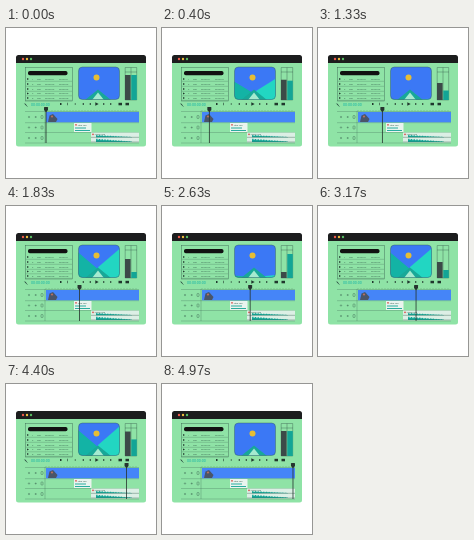
Animation, 150 px wide and 150 px high, one loop 5.01 s. Source, as an HTML page:

```html
<!DOCTYPE html>
<html lang="en">
<head>
<meta charset="utf-8">
<title>Video editor</title>
<style>
html, body { margin: 0; width: 100%; height: 100%; overflow: hidden; background: #fff; }
svg { display: block; width: 100vw; height: 100vh; }
text { font-family: Roboto, Arial, sans-serif; font-size: 2.4px; fill: #33594a; }
.line { fill: none; stroke: #33594a; stroke-width: .4; }
</style>
</head>
<body>
<svg viewBox="0 0 150 150">
  <defs>
    <clipPath id="screen"><rect x="72.5" y="39" width="41" height="32.5" rx="4"/></clipPath>
  </defs>
  <path fill="#8fe3a6" d="M10 34H140V116Q140 118.500 137.500 118.500H12.500Q10 118.500 10 116Z"/>
  <path fill="#1c1d1e" d="M10 35V29.500Q10 27 12.500 27H137.500Q140 27 140 29.500V35Z"/>
  <circle cx="17" cy="31" r="1.2" fill="#ef5b4c"/>
  <circle cx="21" cy="31" r="1.2" fill="#efbd3e"/>
  <circle cx="25" cy="31" r="1.2" fill="#59bd63"/>

  <rect class="line" x="19.500" y="39.500" width="47" height="33.500"/>
  <rect x="22" y="43" width="39.500" height="4.200" rx="1.800" fill="#111"/>
  <g id="list"></g>

  <g clip-path="url(#screen)">
    <rect x="72" y="38" width="42" height="34" fill="#3b78f5"/>
    <circle cx="90.500" cy="49.500" r="3" fill="#e6bd35"/>
    <path id="left" fill="#13b3a5"/>
    <path id="right" fill="#22d6c2"/>
    <path id="peak" fill="#18a898"/>
    <path id="road" fill="#a5ead0"/>
  </g>
  <rect class="line" x="72.500" y="39" width="41" height="32.500" rx="4"/>

  <path class="line" d="M119.200 39.500H130.700V72H119.200ZM119 44H131M125 39.500V72"/>
  <rect id="dark" x="119" width="5.600" fill="#3c4a48"/>
  <rect id="teal" x="125.300" width="5.500" fill="#13a596"/>

  <path class="line" d="M18.700 75.800L21.300 78.500M19 75.500L20 77" style="stroke-width:.9"/>
  <text x="25" y="78.300" style="fill:#13b3a5;font-size:3.6px">00:00:00:00</text>
  <g id="controls" fill="#20372d"></g>

  <path class="line" d="M39 83V115M19 83.500H133M19 94.700H133M19 104.500H133M19 115H133" opacity=".65"/>
  <path id="ruler" class="line" opacity=".6"/>
  <g id="tracks"></g>
  <rect x="40" y="84" width="93" height="10.300" fill="#4585f8"/>
  <path d="M42 94L43.500 87.500L47 86L51.500 91L50 94Z" fill="#4a5568"/>
  <circle cx="46" cy="88.500" r="1.100" fill="#b8705f"/>

  <rect x="68" y="95" width="17.500" height="9" fill="#e9f4ee"/>
  <circle cx="70" cy="96.800" r=".9" fill="#d9534f"/>
  <text x="71.500" y="98">Title clip</text>
  <path class="line" d="M69 100H80M69 102.500H84" style="stroke:#13a596;stroke-width:.9"/>

  <rect x="85" y="104.500" width="48" height="10" fill="#dcefe5"/>
  <path id="wave" fill="#13a596"/>
  <path class="line" d="M85 109.300H133M85 114H133"/>
  <circle cx="87" cy="106.300" r=".9" fill="#d9534f"/>
  <text x="88.500" y="107">Audio clip</text>

  <g id="playhead" fill="#26342f">
    <path d="M-2 79.500Q-2 79 -1.500 79H1.500Q2 79 2 79.500V82L0 84.300L-2 82Z"/>
    <rect x="-.4" y="82" width=".8" height="33"/>
  </g>
</svg>
<script>
const $ = id => document.getElementById(id);
const duration = 5010;
const set = (id, values) => {
  for (const key in values) $(id).setAttribute(key, values[key]);
};

$("list").innerHTML = [51, 56, 61, 65.500, 70].map((y, i) => `
  <path fill="#20372d" d="M21 ${y - 1.100}L23 ${y}L21 ${y + 1.100}Z"/>
  <text x="26" y="${y + .8}">${i + 1}</text>
  <text x="31" y="${y + .8}">clip</text>
  <text x="39" y="${y + .8}">00:00:0${i + 1}</text>
  <text x="53" y="${y + .8}">00:00:0${i + 1}</text>
  <path class="line" d="M20 ${y + 2.300}H66" opacity=".6"/>`).join("");

const triangle = (x, size, dir = 1) =>
  `M${x - size * dir} ${76 - size}L${x + size * dir} 76L${x - size * dir} ${76 + size}Z`;
$("controls").innerHTML = `
  <path d="M54 75H55.500V77H54ZM61 74.700H61.600V77.300H61Z"/>
  <path d="${triangle(69, .8, -1)}${triangle(77, 1, -1)}${triangle(84, 1, -1)}"/>
  <path d="${triangle(91, 1.700)}${triangle(98, 1)}${triangle(105, 1)}"/>
  <rect x="112.500" y="74.800" width="3.500" height="2.500"/>
  <rect x="119.500" y="74.800" width="3.500" height="2.500"/>`;

let ticks = "";
for (let x = 40; x < 133; x += 3) ticks += `M${x} 82V83.200`;
set("ruler", { d: ticks });

$("tracks").innerHTML = [89, 99.500, 110].map(y => `
  <circle class="line" cx="23" cy="${y}" r=".7"/>
  <path class="line" d="M28.700 ${y}H30.700M29.700 ${y - 1}V${y + 1}"/>
  <rect class="line" x="35" y="${y - 1.500}" width="2" height="3" rx=".6"/>`).join("");

// Two audio channels, each fading towards the right.
const channel = (base, height) => {
  let path = `M90 ${base}`;
  for (let x = 90; x <= 126; x++) {
    const fade = 1 - (x - 90) / 42;
    path += `L${x} ${base - height * fade * (.7 + .3 * Math.sin(x * 2.3))}`;
  }
  return path + `L126 ${base}Z`;
};
set("wave", { d: channel(109.300, 2.800) + channel(114, 4) });

const darkKeys = [[0, 47], [830, 57], [1830, 53], [2630, 66], [3170, 56], [3830, 48], [5010, 47]];
const tealKeys = [[0, 47], [830, 59], [1830, 66], [2630, 48], [3170, 64], [3830, 63], [5010, 47]];
function level(keys, time) {
  const i = keys.findIndex(key => key[0] > time);
  const [start, from] = keys[i - 1], [end, to] = keys[i];
  const progress = (1 - Math.cos(Math.PI * (time - start) / (end - start))) / 2;
  return from + (to - from) * progress;
}

function draw(time) {
  const lift = (1 - Math.cos(time / duration * Math.PI * 8)) / 2;
  set("left", { d: `M72 ${72 - 26 * lift}L92 ${72 - 9 * lift}V72H72Z` });
  set("right", { d: `M114 ${72 - 30 * lift}L92 ${72 - 11 * lift}V72H114Z` });
  set("peak", { d: "M79 72L92 61.500L105 72Z" });
  set("road", { d: "M86 72L92 64.500L98 72Z" });
  for (const [id, keys] of [["dark", darkKeys], ["teal", tealKeys]]) {
    const y = level(keys, time);
    set(id, { y, height: 72 - y });
  }
  set("playhead", { transform: `translate(${40 + 91.700 * time / duration} 0)` });
}

const start = performance.now();
function tick(now) {
  draw(Math.max(0, now - start) % duration);
  requestAnimationFrame(tick);
}
draw(0);
requestAnimationFrame(tick);
</script>
</body>
</html>
```
